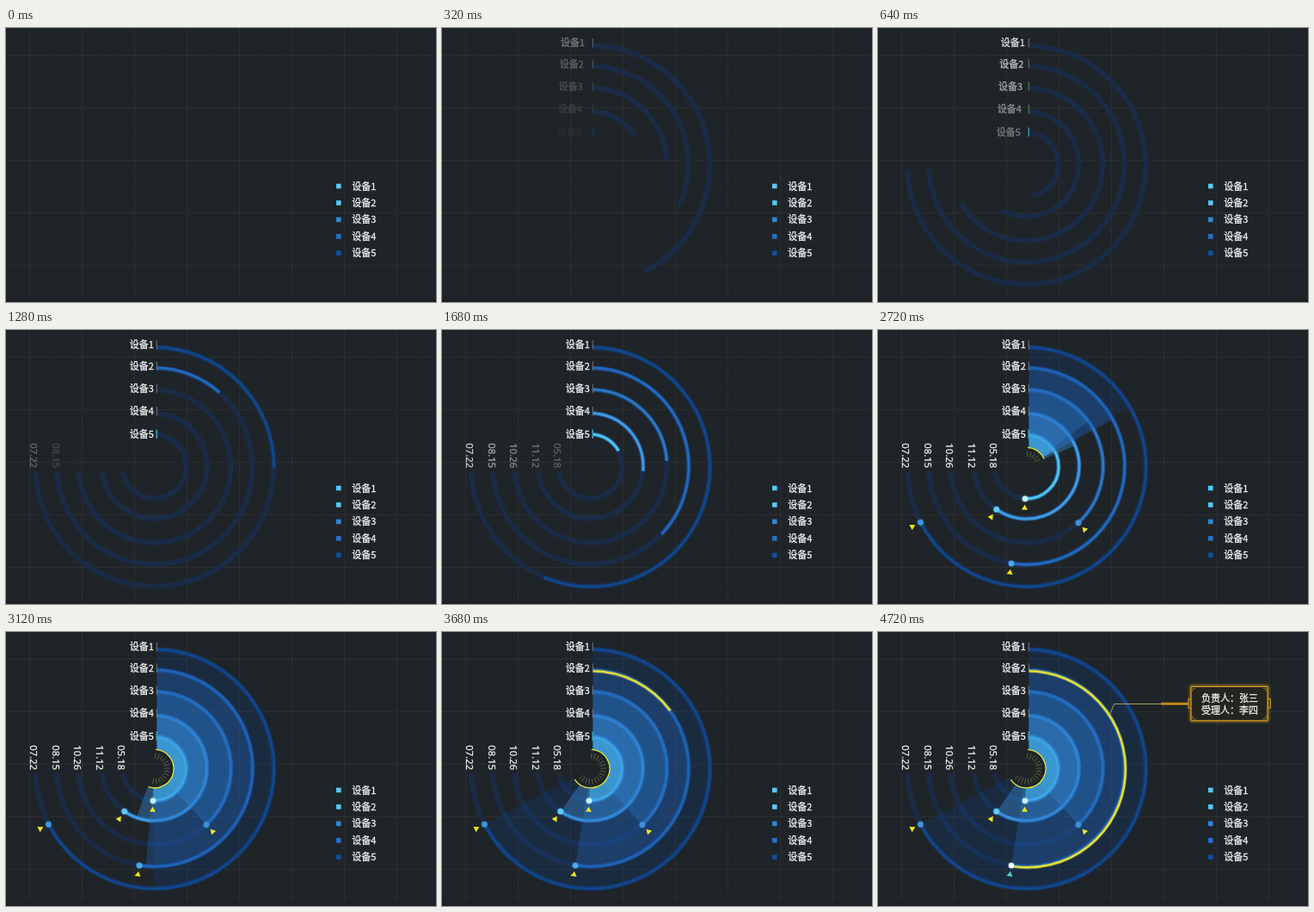
Recreate the animation shown at these times as an HTML page. Size 500 by 318 pixels, loop 5760 ms.

```html
<!DOCTYPE html>
<html lang="zh-CN">
<head>
<meta charset="utf-8">
<title>设备</title>
<style>
  html, body { margin: 0; width: 100%; height: 100%; overflow: hidden; background: #1f2428; }
  svg { display: block; width: 100vw; height: 100vh; }
  text {
    font: 11px "Noto Sans CJK SC", "Noto Sans CJK", "Noto Sans CJK JP", sans-serif;
    fill: #eceeef; stroke: #eceeef; stroke-width: .3px;
  }
  .date { font: 11.3px "Noto Sans", sans-serif; }
</style>
</head>
<body>
<svg id="stage" viewBox="0 0 500 318">
  <defs>
    <clipPath id="open"><path d="M175.5 0H500V318H0V164H175.5Z"/></clipPath>
    <filter id="glow" x="-20%" y="-40%" width="140%" height="180%"><feGaussianBlur stdDeviation="1.6"/></filter>
  </defs>
</svg>
<script>
const LOOP = 5760, STEP = 80;
const CX = 172.7, CY = 158.6, HOLE = 22.3;
const SWEEP_START = 2300;

// track, arc, fade: [start, end] in ms; end: final angle in degrees; dy: vertical offset of the ring
const rings = [
  { r: 139, dy: .4, end: 242.5, color: '#11468b', fill: '#114690', alpha: .22, dot: '#3f98dc',
    labelY: 21, date: '07.22', track: [0, 560], arc: [960, 1820], sweepEnd: 3280, fade: [1000, 1800] },
  { r: 114.2, dy: -.5, end: 188.9, color: '#2169bd', fill: '#2068c0', alpha: .32, dot: '#4aa8ee',
    labelY: 45.5, date: '08.15', track: [80, 640], arc: [1100, 1920], sweepEnd: 3130, fade: [1130, 1960] },
  { r: 89, dy: -.4, end: 137.4, color: '#2b78c6', fill: '#2a78c8', alpha: .35, dot: '#3f92da',
    labelY: 71.5, date: '10.26', track: [140, 700], arc: [1280, 1920], sweepEnd: 3040, fade: [1260, 2060] },
  { r: 61.3, dy: -.7, end: 214.8, color: '#3f9be6', fill: '#3c9cec', alpha: .35, dot: '#62ccfb',
    labelY: 98, date: '11.12', track: [200, 765], arc: [1360, 2080], sweepEnd: 3155, fade: [1360, 2160] },
  { r: 37.4, dy: -.1, end: 182.6, color: '#4fc3f6', fill: '#4cc4fa', alpha: .5, dot: '#c4f3ff',
    labelY: 124.5, date: '05.18', track: [300, 840], arc: [1440, 2160], sweepEnd: 3120, fade: [1440, 2240] },
];

const svg = document.getElementById('stage');

function add(tag, attrs, parent = svg, text = '') {
  const el = document.createElementNS('http://www.w3.org/2000/svg', tag);
  for (const key in attrs) el.setAttribute(key, attrs[key]);
  el.textContent = text;
  return parent.appendChild(el);
}

const progress = (t, [start, end]) => Math.min(1, Math.max(0, (t - start) / (end - start)));

// Angles run clockwise from the top
function polar(r, deg) {
  const a = deg * Math.PI / 180;
  return [CX + r * Math.sin(a), CY - r * Math.cos(a)];
}

function arcPath(r, deg, from = 0) {
  if (deg <= from) return '';
  return `M${polar(r, from)}A${r} ${r} 0 ${+(deg - from > 180)} 1 ${polar(r, deg)}`;
}

function sectorPath(r, deg) {
  if (deg <= 0) return '';
  return `${arcPath(r, deg)}L${polar(HOLE, deg)}A${HOLE} ${HOLE} 0 ${+(deg > 180)} 0 ${polar(HOLE, 0)}Z`;
}

const stroke = (color, width, parent, opacity = 1) =>
  add('path', { fill: 'none', stroke: color, 'stroke-width': width, opacity }, parent);

// Background
add('rect', { width: 500, height: 318, fill: '#1f2428' });
const grid = add('g', { stroke: '#4a4140', 'stroke-width': 1, 'stroke-dasharray': '1 1', opacity: .65 });
for (let x = 27.5; x < 500; x += 61) add('path', { d: `M${x} 0V314` }, grid);
for (let y = 31.5; y < 314; y += 61) add('path', { d: `M0 ${y}H500` }, grid);
add('rect', { y: 314, width: 500, height: 4, fill: '#1d2125' });

// Legend
['#55c9f7', '#55c9f7', '#3186d2', '#2670cb', '#144c9a'].forEach((fill, i) => {
  const y = 183.5 + 19.45 * i;
  add('rect', { x: 384, y: y - 2.8, width: 5.6, height: 5.6, fill });
  add('text', { x: 402.3, y: y + 4 }, svg, `设备${i + 1}`);
});

// Chart layers; sectors tint the arcs beneath them
const chart = add('g', { 'clip-path': 'url(#open)' });
const [trackLayer, arcLayer, sectorLayer] = [0, 1, 2].map(() => add('g', {}, chart));
const highlightLayer = add('g', { transform: 'translate(1.1 .7)' }, chart);
const highlight = [stroke('#8f9a4a', 4.4, highlightLayer, .4), stroke('#e3df38', 2.6, highlightLayer)];
const markerLayer = add('g', {});

rings.forEach((ring, i) => {
  const transform = `translate(0 ${ring.dy})`;
  const arcs = add('g', { transform }, arcLayer);
  ring.trackEl = stroke('#1a2b46', 6, add('g', { transform }, trackLayer));
  ring.sectorEl = add('path', { fill: ring.fill, 'fill-opacity': ring.alpha }, sectorLayer);
  ring.arcEls = [stroke(ring.color, 5, arcs, .4), stroke(ring.color, 2.8, arcs)];

  ring.labelEl = add('g', {});
  add('text', { x: 143.7, y: ring.labelY }, ring.labelEl, `设备${i + 1}`);
  ring.tickEl = add('path', {
    d: `M175.3 ${ring.labelY - 9}v10.5`,
    stroke: i === 4 ? '#3fa9cc' : '#7b8084', 'stroke-width': i === 4 ? 1.5 : .9,
  });
  ring.dateEl = add('text', {
    class: 'date', transform: `translate(${28 + 25.6 * i} 131.3) rotate(90)`,
  }, svg, ring.date);

  const [x, y] = polar(ring.r, ring.end), [tx, ty] = polar(ring.r + 10, ring.end);
  ring.markerEl = add('g', { transform }, markerLayer);
  add('circle', { cx: x, cy: y, r: 4.3, fill: ring.dot, opacity: .3 }, ring.markerEl);
  ring.dotEl = add('circle', { cx: x, cy: y, r: 3.2 }, ring.markerEl);
  ring.pointerEl = add('path', {
    d: 'M0 3.2L3.5 -2.8H-3.5Z', transform: `translate(${tx} ${ty}) rotate(${ring.end})`,
  }, ring.markerEl);
});

// Inner gauge
const gauge = stroke('#e9e52e', 1.3);
const gaugeTicks = [];
for (let deg = 4; deg < 236; deg += 14) {
  const el = add('path', {
    d: `M${polar(11.5, deg)}L${polar(18, deg)}`, stroke: '#6b6838', 'stroke-width': .9,
  });
  gaugeTicks.push({ deg, el });
}

// Callout
const thinLine = add('path', {
  d: 'M270 95L274.5 83.5H329', fill: 'none', stroke: '#a89a5c', 'stroke-width': 1,
  pathLength: 67, 'stroke-dasharray': '67 200',
});
const thickLine = add('path', { stroke: '#c08a17', 'stroke-width': 3 });
const callout = add('g', {});
const frame = { x: 364, y: 63.3, width: 89, height: 39.5, rx: 1 };
add('rect', { ...frame, fill: 'none', stroke: '#c08a17', 'stroke-width': 4, filter: 'url(#glow)', opacity: .6 }, callout);
add('rect', { ...frame, fill: '#25251f', stroke: '#d39a1c', 'stroke-width': 1.3 }, callout);
add('path', {
  d: 'M364 77.5H361V88.5H364M453 77.5H456.3V88.5H453', fill: 'none', stroke: '#c9921a', 'stroke-width': 1.2,
}, callout);
add('path', {
  d: 'M366 69V65.3H369.5M447.5 65.3H451V69M366 97V100.8H369.5M447.5 100.8H451V97',
  fill: 'none', stroke: '#a87a1a', 'stroke-width': .9,
}, callout);
add('text', { x: 376, y: 80.5 }, callout, '负责人：张三');
add('text', { x: 376, y: 94.5 }, callout, '受理人：李四');

const setPath = (els, d) => els.forEach(el => el.setAttribute('d', d));
const sweep = (t, end) => progress(t, [SWEEP_START, end]) ** 1.65;

function render(t) {
  const selected = t >= 4160;

  rings.forEach((ring, i) => {
    setPath([ring.trackEl], arcPath(ring.r - .4, 268 * progress(t, ring.track)));
    setPath([ring.sectorEl], sectorPath(ring.r, ring.end * sweep(t, ring.sweepEnd)));
    setPath(ring.arcEls, arcPath(ring.r, ring.end * progress(t, ring.arc)));

    const shown = progress(t, [40 + 60 * i, 700 + 110 * i]);
    ring.labelEl.setAttribute('opacity', shown);
    ring.labelEl.setAttribute('transform', `translate(${-10 * (1 - shown)} 0)`);
    ring.tickEl.setAttribute('opacity', Math.min(1, shown * 2));
    ring.dateEl.setAttribute('opacity', progress(t, ring.fade));

    const active = selected && i === 1;
    ring.markerEl.setAttribute('opacity', +(t >= ring.arc[1]));
    ring.dotEl.setAttribute('fill', active ? '#ffffff' : ring.dot);
    ring.pointerEl.setAttribute('fill', active ? '#4fd3b4' : '#f0e521');
  });

  const gaugeEnd = 236 * sweep(t, 3210);
  setPath([gauge], arcPath(HOLE, gaugeEnd, 3));
  gaugeTicks.forEach(({ deg, el }) => el.setAttribute('opacity', +(deg < gaugeEnd)));

  setPath(highlight, arcPath(114, rings[1].end * progress(t, [3520, 4086])));

  thinLine.setAttribute('stroke-dashoffset', 67 * (1 - progress(t, [4100, 4360])));
  thinLine.setAttribute('opacity', +selected);
  const thick = 32 * progress(t, [4360, 4480]);
  thickLine.setAttribute('d', thick ? `M329 83.3h${thick}` : '');
  callout.setAttribute('opacity', progress(t, [4440, 4720]));
}

const startTime = performance.now();
function tick() {
  const t = (performance.now() - startTime) % LOOP;
  render(Math.floor(t / STEP) * STEP);
  requestAnimationFrame(tick);
}
tick();
</script>
</body>
</html>
```
